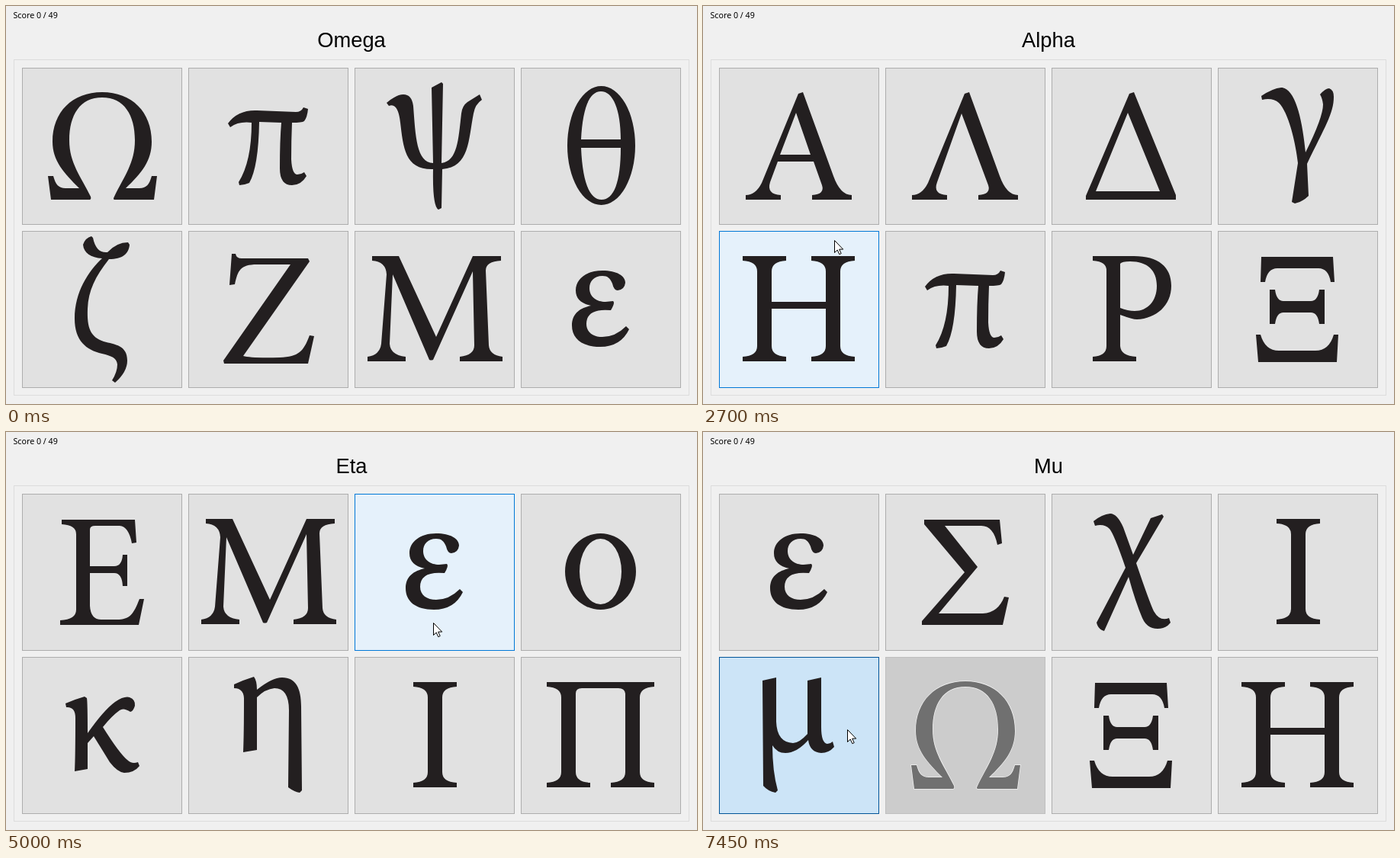
Animation, 906 px wide and 522 px high, one loop 7500 ms. Source, as an HTML page:

```html
<!DOCTYPE html>
<html lang="en">
<head>
<meta charset="utf-8">
<title>Greek letter quiz</title>
<style>
html, body { margin: 0; width: 100%; height: 100%; overflow: hidden; background: #f0f0f0; }
svg { display: block; }
.score { font: 10.7px "Noto Sans", "Open Sans", sans-serif; }
.title { font: 27.3px "Liberation Sans", Arial, sans-serif; text-anchor: middle; }
.cell rect { fill: #e1e1e1; stroke: #adadad; }
.cell path { fill: #231f20; fill-rule: evenodd; }
.hover rect { fill: #e5f1fb; stroke: #0078d7; }
.down rect { fill: #cce4f7; stroke: #005499; }
.off rect { fill: #ccc; stroke: #bfbfbf; }
.off path { fill: #707070; stroke: #f4f4f4; stroke-width: 1.4; paint-order: stroke; }
</style>
</head>
<body>
<svg id="stage" width="906" height="522" viewBox="0 0 906 522">
  <rect x="10.5" y="70.5" width="885" height="440" fill="none" stroke="#dcdcdc"/>
  <text class="score" x="9.5" y="16"></text>
  <text class="title" x="453" y="54"></text>
  <g id="cells"></g>
  <path id="cursor" d="M.5 .5V16.5L4.2 13 6.8 18.7 9.2 17.6 6.7 12.1H11.7Z" fill="#fff" stroke="#000"/>
</svg>
<script>
const LOOP = 7500, STEP = 50;

// Upright stroke with serifs, 57 wide
const stem = x => `M${x} 33h57v6q-19 1-19 14v98q0 13 19 14v6h-57v-6q19-1 19-14v-98q0-13-19-14z`;
const ring = (x, y, rx, ry) => `M${x - rx} ${y}a${rx} ${ry} 0 0 1 ${2 * rx} 0a${rx} ${ry} 0 0 1 ${-2 * rx} 0z`;
// Capital built on two slanted legs; inner is the edge between the feet
const legs = inner => `M104 34L110 32 150 142Q159 167 174 167V173H122V167Q139 166 135 154L${inner}Q62 166 81 167V173H35V167Q48 167 56 151Z`;

const glyphs = {
  Omega: "M34 142H41C44 153 48 158 57 158H75C55 138 40 122 40 97C40 58 66 32 105 32C144 32 170 58 170 97C170 122 157 138 136 158H154C163 158 167 153 170 142H177L173 173H121Q119 172 121 169C134 142 148 125 148 95C148 62 134 39 105 39C76 39 62 62 62 95C62 125 77 142 90 169Q91 172 89 173H38Z",
  pi: "M52 73Q65 55 90 56L141 58Q148 58 151 52L157 54Q156 65 152 70Q149 72 136 72Q135 95 135 120Q136 140 143 140Q148 140 152 137L155 142Q148 154 136 154Q120 154 120 132Q120 95 122 72L93 71Q92 130 80 151Q73 154 67 154L66 150Q83 123 83 72Q66 70 55 78Z",
  psi: "M42 46Q55 35 64 35Q75 35 77 50C80 90 81 124 103 125L101 26 114 19 116 21 114 125C135 122 136 95 140 60Q141 50 148 45L164 35 167 42Q158 48 156 60C149 95 151 130 115 133L114 184 110 186Q102 182 103 133C66 134 64 105 60 72Q57 45 45 50Z",
  theta: ring(105.5, 102, 44.5, 78) + "M79 94C81 55 89 31 105 31S131 55 131 94ZM79 105C81 150 90 173 106 173S131 150 131 105Z",
  zeta: "M80 18Q83 9 91 7L93 9C96 24 103 29 112 28Q124 15 139 15L141 18C140 30 132 37 114 37C96 60 87 78 86 102C85 128 90 139 107 145C122 149 138 150 138 170Q138 185 122 199L118 196Q125 185 125 175C124 166 117 164 105 161C84 156 69 144 69 115C69 80 87 53 105 36C90 35 81 29 80 18Z",
  Zeta: "M54 71L57 30H62Q63 36 70 36H157L159 40 72 164Q82 167 120 166C145 165 151 158 159 137L165 138 157 174H47L46 170 134 44H90C68 44 65 52 61 70Z",
  Mu: "M23 33H58L107 139 155 33H192V39Q172 40 172 52L176 150Q177 163 194 165V171H138V165Q157 163 157 150L155 53 103 169Q100 170 98 169L50 57 46 148Q47 163 67 165V171H17V165Q33 163 35 148L42 57Q41 40 23 39Z",
  epsilon: "M67 124C67 108 78 101 92 98C79 95 72 89 72 78C72 63 86 52 107 52C126 52 137 59 137 68Q136 77 127 78Q122 78 120 69C117 62 114 59 107 59C96 59 90 66 90 75C90 87 100 93 111 93L121 92Q124 94 118 104Q86 101 86 122C86 133 95 139 107 139Q124 139 138 125L142 129Q131 152 104 152C80 152 67 141 67 124Z",
  Alpha: legs("124 123H77L67 150") + "M101 59L80 114H120Z",
  Lambda: legs("100 60 68 150"),
  Delta: "M102 34L108 32 163 167V173H45V168ZM100 59L58 162H142Z",
  gamma: "M57 37Q72 27 83 26C102 26 111 70 115 111Q138 65 138 48Q137 40 134 35Q141 27 146 27Q152 29 152 38C152 60 140 78 117 126L119 168Q111 176 101 178L97 176 105 125C101 90 90 55 80 46Q72 39 58 42Z",
  Eta: stem(31) + stem(121) + "M69 93H140V102H69Z",
  Rho: "M54 33H108C140 33 157 47 157 72C157 98 137 115 112 116Q106 116 90 110V151Q91 164 111 165V171H54V165Q72 164 72 151V53Q73 40 54 39ZM90 43V101Q100 105 109 105C126 105 138 92 138 72C138 52 126 40 103 40Q92 40 90 43Z",
  Xi: "M57 34H151L153 67H148Q145 49 132 49H78Q65 49 62 67H56ZM68 77H75Q77 92 86 92H122Q131 92 133 77H140V122H133Q131 107 122 107H86Q77 107 75 122H68ZM50 136H56Q62 157 80 157H128Q146 157 152 136H158L156 172H53Z",
  Epsilon: "M52 34H148L150 64 144 65Q140 43 128 42H96Q89 42 89 47V95H121Q131 95 132 80H138V121H132Q131 104 121 104H89V147Q90 165 104 165H124C142 165 146 158 154 138H160L153 172H50V166Q71 165 71 152V53Q71 41 52 40Z",
  omicron: ring(104.5, 102, 46.5, 50) + ring(104.5, 102, 27.5, 43),
  kappa: "M57 61Q68 56 82 52L85 54Q86 60 86 100Q107 70 122 59Q134 51 141 53Q149 56 148 64Q146 71 142 72Q133 66 128 70Q118 77 106 92Q128 127 138 135Q144 141 152 138L154 143Q147 152 134 152Q125 151 115 138Q104 120 94 104L86 113V147L69 150Q70 130 70 80Q70 65 58 66Z",
  eta: "M60 36Q73 30 86 26Q90 31 90 43Q110 27 123 27C141 27 148 41 148 65L149 175 146 178Q139 177 131 171L132 70Q132 41 113 41Q101 42 90 53V122L72 125Q73 100 73 58Q74 41 60 41Z",
  Iota: stem(77),
  Pi: "M34 33H175V39Q156 40 156 53V151Q156 164 175 165V171H118V165Q137 164 137 151V48Q136 41 128 41H80Q72 41 72 48V151Q72 164 91 165V171H34V165Q53 164 53 151V53Q53 40 34 39Z",
  Sigma: "M51 34H150L153 65 147 67Q142 42 126 42H78L121 96 70 157H128Q148 156 156 135L162 136 154 172H48V167L104 103 51 40Z",
  chi: "M55 36Q66 27 77 26Q86 26 94 44L107 80 130 32 145 27 147 30 111 91Q129 144 134 154Q142 168 154 163L156 169Q150 177 139 177Q125 177 119 163Q110 142 101 109L69 180Q61 178 59 169L97 97Q82 53 76 46Q69 39 57 42Z",
  mu: "M57 31L75 27V85Q76 112 97 113Q105 113 116 101V31L134 27V92Q134 113 142 114Q146 114 149 111L151 118Q144 126 134 126Q119 125 117 109Q102 126 87 126Q76 126 70 116Q70 150 77 175L74 178Q64 176 58 169Z"
};

const pages = [
  { from: 0, title: "Omega", set: "Omega pi psi theta zeta Zeta Mu epsilon" },
  { from: 2550, title: "Alpha", set: "Alpha Lambda Delta gamma Eta pi Rho Xi" },
  { from: 4400, title: "Eta", set: "Epsilon Mu epsilon omicron kappa eta Iota Pi" },
  { from: 5600, title: "Mu", set: "epsilon Sigma chi Iota mu Omega Xi Eta" }
];

// Button held from down to up; a wrong answer greys its cell and costs a point
const clicks = [
  { down: 1300, up: 1400, cell: 7, gain: -1 },
  { down: 2450, up: 2550, cell: 0, gain: 1 },
  { down: 2800, up: 2900, cell: 4, gain: -1 },
  { down: 4300, up: 4400, cell: 0, gain: 1 },
  { down: 5500, up: 5600, cell: 5, gain: 1 },
  { down: 7250, up: 7350, cell: 5, gain: -1 },
  { down: 7450, up: 7500, cell: 4, gain: 1 }
];

// Pointer way: time, x, y
const way = [
  [50, 702, 512], [100, 672, 503], [250, 620, 440], [500, 400, 330], [800, 150, 200],
  [1050, 648, 372], [1250, 770, 405], [1400, 776, 412], [1600, 645, 395], [2000, 400, 330],
  [2400, 170, 225], [2550, 171, 232], [2700, 172, 307], [2900, 168, 370], [3050, 700, 400],
  [3200, 640, 405], [3500, 400, 330], [3900, 180, 210], [4350, 177, 224], [4450, 180, 228],
  [4800, 300, 280], [5000, 560, 250], [5200, 750, 370], [5400, 480, 392], [5550, 361, 396],
  [5600, 355, 397], [5850, 140, 400], [6100, 330, 260], [6400, 682, 232], [6600, 760, 255],
  [6900, 540, 380], [7200, 350, 393], [7350, 330, 394], [7450, 189, 390]
];

const NS = "http://www.w3.org/2000/svg";
const find = q => document.querySelector(q);
const add = (parent, tag, attrs) => {
  const el = parent.appendChild(document.createElementNS(NS, tag));
  for (const k in attrs) el.setAttribute(k, attrs[k]);
  return el;
};

const cells = Array.from({ length: 8 }, (_, i) => {
  const x = 21 + i % 4 * 218, y = 81 + (i >> 2) * 214;
  const g = add(find("#cells"), "g", { class: "cell", transform: `translate(${x} ${y})` });
  add(g, "rect", { x: .5, y: .5, width: 209, height: 205 });
  return { x, y, g, path: add(g, "path", {}) };
});
const score = find(".score"), title = find(".title"), cursor = find("#cursor");

function pointer(t) {
  if (t < way[0][0]) return null;
  const i = way.findIndex(p => p[0] >= t);
  if (i < 1) return way[i < 0 ? way.length - 1 : 0].slice(1);
  const a = way[i - 1], b = way[i], k = (t - a[0]) / (b[0] - a[0]);
  return [1, 2].map(n => Math.round(a[n] + (b[n] - a[n]) * k));
}

function draw(t) {
  const page = pages.filter(p => p.from <= t).pop();
  const names = page.set.split(" ");
  const done = clicks.filter(c => c.up <= t);
  const held = clicks.find(c => c.down <= t && t < c.up);
  const pos = pointer(t);

  score.textContent = `Score ${done.reduce((sum, c) => sum + c.gain, 0)} / 49`;
  title.textContent = page.title;
  cells.forEach((c, i) => {
    const over = pos && pos[0] >= c.x && pos[0] < c.x + 210 && pos[1] >= c.y && pos[1] < c.y + 206;
    const off = done.some(k => k.cell === i && k.gain < 0 && k.up >= page.from);
    const state = off ? "off" : held && held.cell === i ? "down" : over ? "hover" : "";
    c.g.setAttribute("class", "cell " + state);
    c.path.setAttribute("d", glyphs[names[i]]);
  });
  cursor.style.display = pos ? "" : "none";
  if (pos) cursor.setAttribute("transform", `translate(${pos})`);
}

const start = performance.now();
let last = -1;
function tick() {
  const t = Math.floor(Math.max(0, performance.now() - start) % LOOP / STEP) * STEP;
  if (t !== last) draw(last = t);
  requestAnimationFrame(tick);
}
tick();
</script>
</body>
</html>
```
